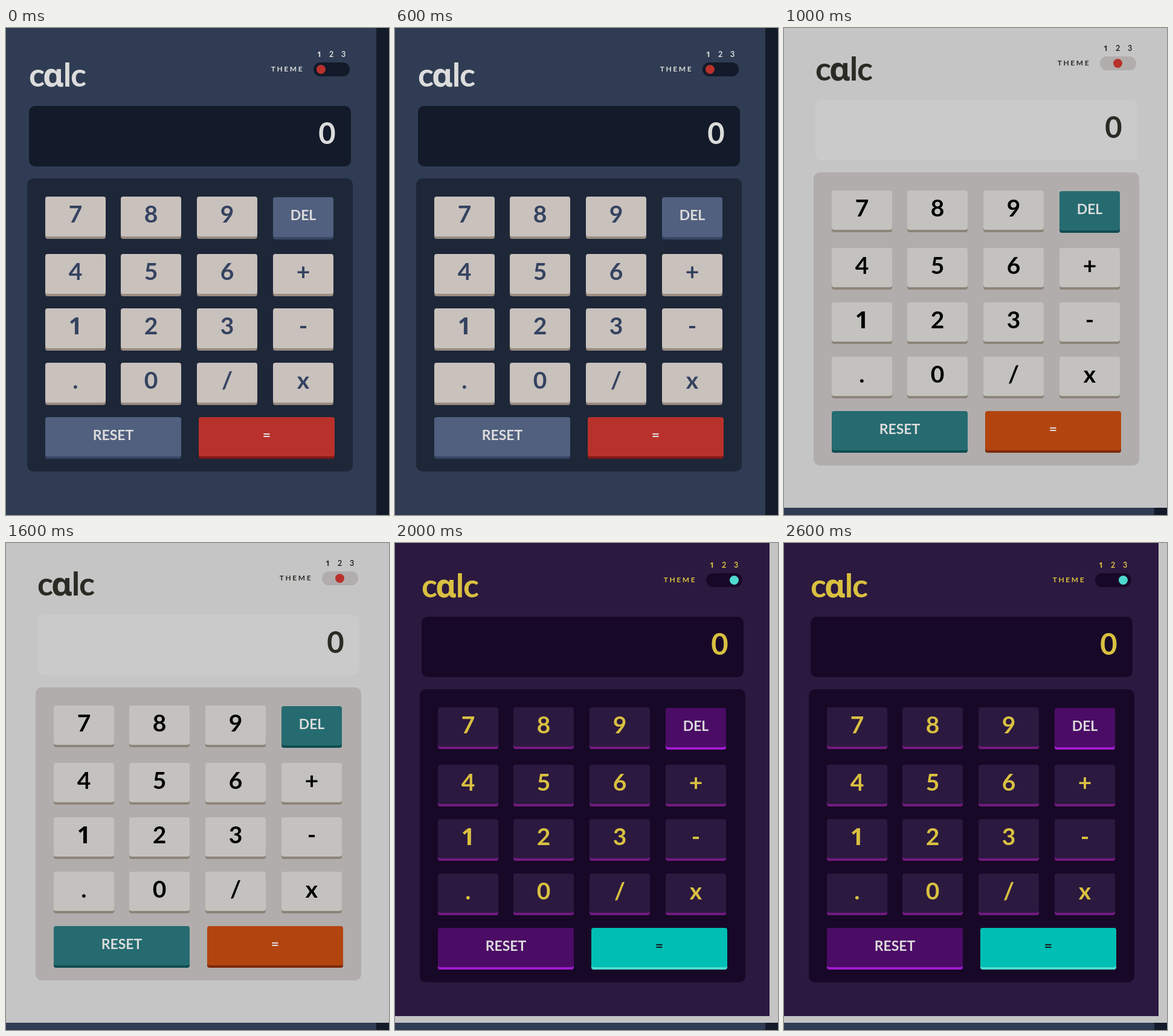
An HTML page for the animation above (3000 ms loop, 634x806 px).

```html
<!DOCTYPE html>
<html lang="en">
<head>
<meta charset="utf-8">
<title>calc</title>
<style>
  html, body { margin: 0; width: 100%; height: 100%; overflow: hidden; }
  svg { display: block; }
  text { font: 700 39px Lato, sans-serif; text-anchor: middle; }
  .plain { font-family: "Open Sans", "Noto Sans", sans-serif; }
  .round { font-family: "Noto Sans", sans-serif; }
</style>
</head>
<body>
<svg id="stage" width="634" height="806" viewBox="0 0 634 806"></svg>
<script>
const HOLD = 1000;
const stage = document.getElementById('stage');

// Each theme is a page laid over the previous one; x, y shift its contents.
const themes = [
  { x: 0, y: 0, w: 613, h: 806, keyH: 70, knobX: 521.5, bg: '#2f3c53', ink: '#dcdcdc',
    screen: '#131a29', pad: '#1d2738', slot: '#131a29', knob: '#b9312b',
    key: ['#c9c1bc', '#998b80', '#344360'], action: ['#51607f', '#384664', '#dcdcdc'],
    equals: ['#b9312b', '#7f1a14', '#dcdcdc'] },
  { x: 14, y: -10, w: 634, h: 794, keyH: 69, knobX: 538.5, bg: '#c5c5c5', ink: '#2b2b25',
    screen: '#cacaca', pad: '#b1adac', slot: '#b1adac', knob: '#b9312b',
    key: ['#c3c2be', '#8c8579', '#000'], action: ['#256b70', '#104c51', '#dcdcdc'],
    equals: ['#b24410', '#7c2a0b', '#dcdcdc'] },
  { x: 6, y: -7, w: 620, h: 783, keyH: 69, knobX: 555.5, bg: '#2b1940', ink: '#d9c040',
    screen: '#180827', pad: '#180827', slot: '#180827', knob: '#50d9d0',
    key: ['#2b1940', '#731a80', '#d9c040'], action: ['#4b0c66', '#a01cd0', '#dcdcdc'],
    equals: ['#00beb4', '#50d9d0', '#171b22'] }
];

const rect = (x, y, w, h, r, fill) =>
  `<rect x="${x}" y="${y}" width="${w}" height="${h}" rx="${r}" fill="${fill}"/>`;

const label = (str, x, y, size, fill, extra = '') =>
  `<text x="${x}" y="${y}" fill="${fill}" style="font-size:${size}px;${extra}"` +
  `${str === '1' ? ' class="plain"' : ''}>${str}</text>`;

function button(str, x, y, w, h, [face, edge, ink], size = 39, drop = 43) {
  return rect(x, y + 4, w, h - 4, 4, edge) + rect(x, y, w, h - 4, 4, face) +
    label(str, x + w / 2, y + drop, size, ink);
}

function keypad(t) {
  const columns = [65, 190, 316, 442], rows = [279, 374, 464, 554];
  const keys = [...'789', 'DEL', ...'456+123-.0/x'];
  return keys.map((str, i) => {
    const x = columns[i % 4], y = rows[i >> 2];
    return str === 'DEL'
      ? button(str, x, y + 1, 100, t.keyH, t.action, 23, 38)
      : button(str, x, y, 100, t.keyH, t.key);
  }).join('') +
    button('RESET', 65, 644, 225, 69, t.action, 23, 38) +
    button('=', 319, 644, 225, 69, t.equals, 23, 38);
}

function page(t) {
  return `<g class="page">${rect(0, 0, t.w, t.h, 0, t.bg)}
    <g transform="translate(${t.x} ${t.y})">
      <text y="97" fill="${t.ink}" style="font-size:54px" aria-label="calc"><tspan
        x="51">c</tspan><tspan x="78" class="round">ɑ</tspan><tspan
        x="101.5">l</tspan><tspan x="120">c</tspan></text>
      ${label('THEME', 466, 72, 12, t.ink, 'letter-spacing:2.6px')}
      ${['1', '2', '3'].map((n, i) => label(n, 518.5 + 20 * i, 48, 12.5, t.ink)).join('')}
      ${rect(509, 57, 60, 23, 11.5, t.slot)}
      <circle cx="${t.knobX}" cy="68.5" r="7.5" fill="${t.knob}"/>
      ${rect(38, 129, 533, 100, 10, t.screen)}
      ${label('0', 531.5, 192, 49, t.ink)}
      ${rect(35, 249, 539, 485, 10, t.pad)}
      ${keypad(t)}
    </g></g>`;
}

stage.innerHTML = rect(0, 0, 634, 806, 0, '#131a29') + themes.map(page).join('');
const pages = stage.querySelectorAll('.page');

function draw() {
  const current = Math.floor(performance.now() / HOLD) % themes.length;
  pages.forEach((p, i) => p.setAttribute('visibility', i <= current ? 'visible' : 'hidden'));
  requestAnimationFrame(draw);
}
draw();
</script>
</body>
</html>
```
